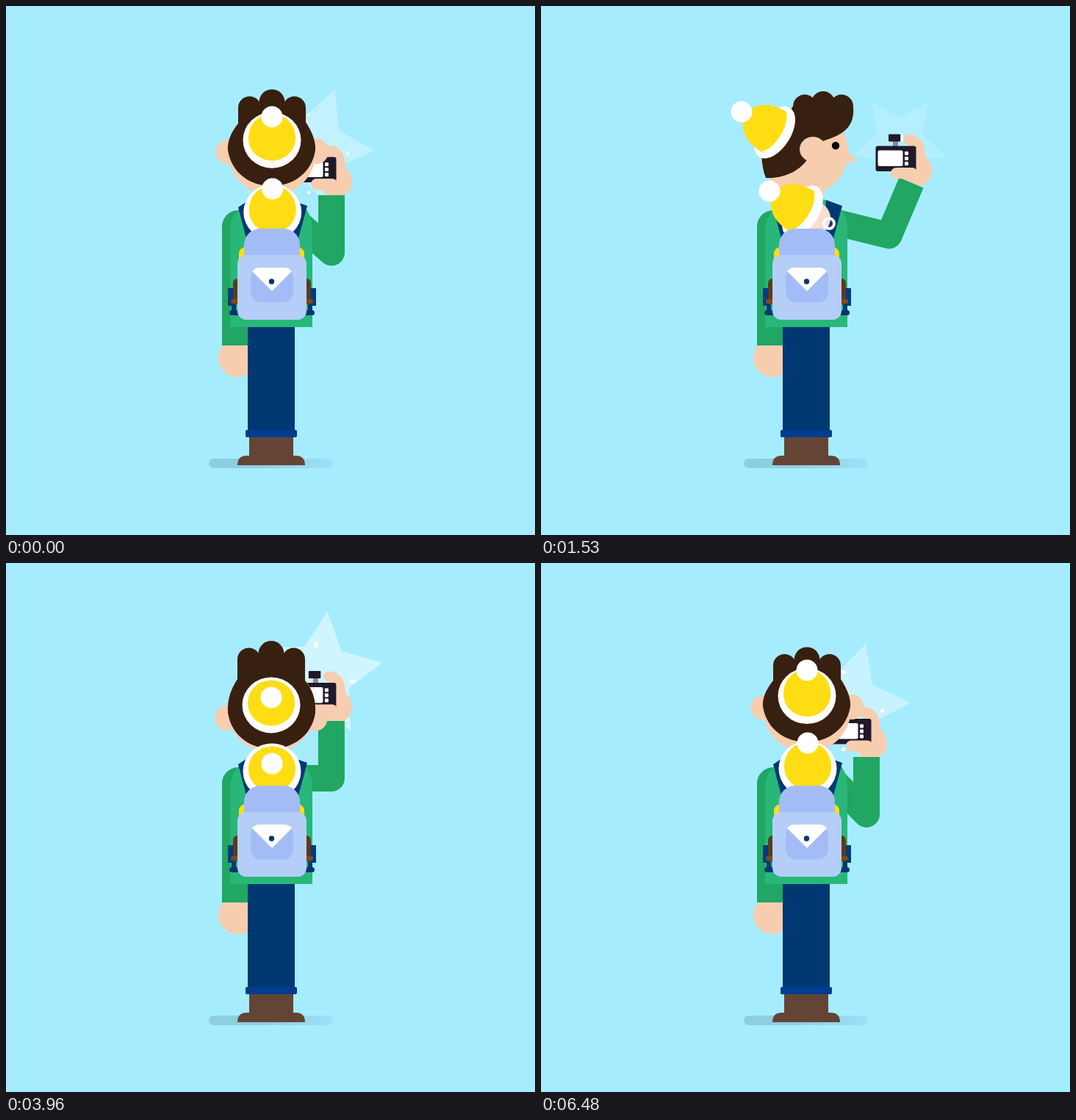
Write an HTML page with a canvas that moves like this. It is 720x720 px and loops after 6.51 s.

```html
<!DOCTYPE html>
<html lang="en">
<head>
<meta charset="utf-8">
<title>Traveller with a camera</title>
<style>
html, body { margin: 0; width: 100%; height: 100%; overflow: hidden; background: #a6ecff; }
canvas { display: block; width: 720px; height: 720px; }
</style>
</head>
<body>
<canvas id="stage" width="720" height="720"></canvas>
<script>
const c = document.getElementById('stage').getContext('2d');
const LOOP = 6510, HALF = LOOP / 2, STEP = 30, TAU = Math.PI * 2;
const SKY = '#a6ecff', SKIN = '#f7cdaf', HAIR = '#372010', NAVY = '#003872', YELLOW = '#ffdd15',
  SLEEVE = '#21a663', JACKET = '#28b779', LILAC = '#a4bcf6', INK = '#20192a', WHITE = '#fff';

// ---- motion ----
const lerp = (a, b, k) => a + (b - a) * k;
function ramp(t, from, to) {
  const u = Math.min(1, Math.max(0, (t - from) / (to - from)));
  return u * u * (3 - 2 * u);
}

// Each half: look up, turn aside, raise the camera, turn back. Right first, then left.
function stateAt(t) {
  const beat = t + 34, p = beat % HALF;
  const out = ramp(p, 734, 1034), back = ramp(p, 2184, 2639);
  return {
    side: Math.floor(beat / HALF) % 2 ? -1 : 1,
    turn: out - back,
    lift: ramp(p, 0, 150) - out + ramp(p, 1384, 1884) - back
  };
}

// start time and centre of each flash
const flashes = [
  [380, 424, 152], [1008, 488, 184], [1890, 488, 135], [2800, 417, 192],
  [3630, 427, 152], [4560, 258, 193], [5290, 248, 146], [6075, 417, 192]
];
const FLASH = 600;

// ---- drawing helpers ----
function oval(x, y, rx, ry, color, angle = 0) {
  c.fillStyle = color;
  c.beginPath();
  c.ellipse(x, y, rx, ry, angle, 0, TAU);
  c.fill();
}
const disc = (x, y, r, color) => oval(x, y, r, r, color);

function box(x, y, w, h, color, r = 0) {
  c.fillStyle = color;
  c.beginPath();
  c.roundRect(x, y, w, h, r);
  c.fill();
}
function shape(d, color) {
  c.fillStyle = color;
  c.fill(new Path2D(d));
}
function line(p, width, color, cap = 'butt') {
  c.strokeStyle = color;
  c.lineWidth = width;
  c.lineCap = cap;
  c.lineJoin = 'round';
  c.beginPath();
  for (let i = 0; i < p.length; i += 2) c.lineTo(p[i], p[i + 1]);
  c.stroke();
}
function placed(x, y, draw, angle = 0) {
  c.save();
  c.translate(x, y);
  c.rotate(angle);
  draw();
  c.restore();
}

// ---- flash ----
function drawStar(u) {
  const start = (104 * u + 18 * Math.max(0, 1 - u / .7)) * TAU / 360;
  const radius = 87 * (1 - Math.abs(2 * u - 1) ** 4.6);
  c.fillStyle = WHITE;
  c.globalAlpha = .65 * (1 - u * u);
  c.beginPath();
  for (let i = 0; i < 10; i++) {
    const a = start + i * TAU / 10, r = i % 2 ? radius / 2 : radius;
    c.lineTo(r * Math.cos(a), r * Math.sin(a));
  }
  c.fill();
  c.globalAlpha = 1;
}

function drawSparks(u) {
  if (u < .25 || u > .9) return;
  const dist = 54 * (1 - (1 - u) ** 3.2), len = Math.min(10, 24 * (.9 - u));
  for (let a = 0; a < 4; a++)
    placed(-5, 9, () => oval(dist, 0, len / 2, Math.min(len, 5.5) / 2, WHITE), a * TAU / 4);
}

function drawFlashes(t) {
  for (const [start, x, y] of flashes) {
    const u = (t - start + LOOP) % LOOP / FLASH;
    if (u < 1) placed(x, y, () => { drawStar(u); drawSparks(u); });
  }
}

// ---- arm and camera ----
function drawArm({ side, turn, lift }) {
  const left = side < 0 ? turn : 0;
  const wx = 443 + (side < 0 ? -160 : 61) * turn, wy = 264 - 9 * turn - 49 * lift;
  const lean = (side < 0 ? -.66 : .4) * turn;
  const ex = wx - 78 * Math.sin(lean), ey = wy + 78 * Math.cos(lean);
  const cx = wx - 21 - 16 * left, cy = wy - 35 + 5 * Math.abs(lean);

  placed(cx, cy, () => {
    shape('M10 -27C14 -36 26 -33 33 -26C39 -20 39 -13 40 -5C43 3 49 8 49 16L10 16L20 -14C18 -19 10 -20 10 -27Z', SKIN);
    disc(27, 16, 22, SKIN);
  });
  line([395, 293, ex, ey, wx, wy], 36, SLEEVE);
  placed(cx, cy, () => {
    box(-4 + 2.5 * left, -24, 7, 8, '#8b8b93');
    box(-10 + 2.5 * left, -33, 16.5, 10, INK, 1);
    if (turn > .2) box(side < 0 ? -11 : 6.5, -33, 3.5, 10, WHITE);
    box(-27.5, -17, 55, 34.5, INK, 3);
    box(-24.5 + 8 * left, -11, 34, 21.5, WHITE, 2);
    for (let i = -1; i < 2; i++) box(12 + 8 * left, i * 7 - 2.5, 5, 5, WHITE, 1);
    line([0.5, 20, 22, 20], 15, SKIN, 'round');
  });
}

// ---- body ----
function drawBody() {
  disc(315, 479, 26, SKIN);
  const shade = c.createLinearGradient(276, 0, 445, 0);
  shade.addColorStop(0, '#8ccddf');
  shade.addColorStop(.45, '#8ecfe2');
  shade.addColorStop(1, '#9de1f9');
  box(276, 616, 169, 13, shade, 6.5);
  shape('M315 625Q315 612 328 612H331V586H391V612H394Q407 612 407 625Z', '#644535');
  box(329, 430, 64, 150, NAVY);
  box(326, 577, 70, 10, '#003d8f', 2);
  box(294, 278, 35, 184, SLEEVE, [22, 0, 0, 0]);
  shape('M305 437V310C305 288 313 279 322 274L345 260H378L400 270C412 276 417 290 417 305V437Z', JACKET);
  shape('M316 274L334 262L342 320H328Z', NAVY);
  shape('M388 264L410 272L397 320H384Z', NAVY);
}

// ---- head and baby; turn 0 shows the back, 1 the profile; up tips the back view ----
function drawHat(x, y, turn, up) {
  const dx = -45 * turn, dy = lerp(-35 + 24.5 * up, -28, turn);
  const reach = lerp(48 - 3 * up, 61, turn), depth = lerp(38, 22, turn);
  placed(x, y, () => {
    oval(0, 0, depth, 39.5, WHITE);
    oval(lerp(2, 5, turn), 0, depth - 8, 32, YELLOW);
    c.beginPath();
    c.moveTo(0, 32);
    c.bezierCurveTo(reach, 34, reach, -34, 0, -32);
    c.fill();
  }, Math.atan2(dy, dx));
  disc(x + dx, y + dy, 14.5, WHITE);
}

function drawHair(turn, up) {
  const at = (a, b) => lerp(a, b, turn);
  const tuft = i => ({
    x: at(362 + 30.5 * i, 384 + 25 * i),
    y: at(132 + 7.5 * Math.abs(i), 132 + 4.5 * Math.abs(i)) - 8.5 * up,
    r: at(17.5 - 2 * Math.abs(i), 16)
  });
  const tufts = [-1, 0, 1].map(tuft), [first, middle, last] = tufts;
  const drop = 9 * up;
  c.fillStyle = HAIR;
  c.beginPath();
  c.moveTo(at(316, 336), at(160, 146));
  c.bezierCurveTo(at(306, 306), at(172, 160), at(301, 292), at(185, 195), at(302, 306), at(195, 234) + drop);
  c.bezierCurveTo(at(312, 325), at(260, 235) + drop, at(411, 350), at(260, 228) + drop, at(421, 363), at(195, 208) + drop);
  c.bezierCurveTo(at(422, 345), at(185, 175), at(417, 430), at(172, 195), at(408, 425), at(158, 138));
  c.lineTo(last.x + last.r, last.y);
  c.lineTo(middle.x, middle.y);
  c.lineTo(first.x - first.r, first.y);
  c.fill();
  for (const { x, y, r } of tufts) disc(x, y, r, HAIR);
}

function drawHead(turn, up) {
  const at = (a, b) => lerp(a, b, turn);
  const earY = at(196 + 15 * up, 195);
  const nearEar = () => oval(at(423, 370), earY, at(16, 18), 17, SKIN);

  if (turn < .25) disc(302 + turn * 60, earY + 1, 16.5, SKIN);
  if (turn < .12) nearEar();
  if (turn > .3) oval(at(362, 420), 207.5, 7.5, 6.5, SKIN);
  disc(at(362, 358), 198, 60, SKIN);
  box(345, 245, 40, 16, SKIN);
  if (turn > .75) disc(at(441, 401), 190, 5.2, '#000');
  drawHair(turn, up);
  if (turn >= .12) nearEar();
  drawHat(at(362, 318), at(181 + 12.5 * up, 172), turn, up);
}

function drawBaby(turn, up) {
  if (turn > .2) disc(358 + 13 * turn, 289, 23, '#fbdccf');
  if (turn > .55) {
    c.strokeStyle = WHITE;
    c.lineWidth = 4;
    c.beginPath();
    c.arc(392, 296, 7, 0, TAU);
    c.stroke();
  }
  drawHat(lerp(363 - 2 * up, 356, turn), 280 + 3.5 * up, turn, up);
}

// Turns a part about a pivot while it keeps stage coordinates.
function tilted(angle, px, py, draw) {
  placed(px, py, () => placed(-px, -py, draw), angle);
}

// ---- backpack ----
function drawPack() {
  box(317, 328, 89, 30, YELLOW, 9);
  for (const side of [1, -1]) {
    c.save();
    c.translate(362, 0);
    c.scale(side, 1);
    box(-60, 384, 8, 24, '#003c80');
    box(-55, 400, 6, 18, NAVY);
    box(-58, 414, 14, 7, NAVY, 3.5);
    box(-53, 371, 14, 35, '#5b3a1c', [6, 0, 0, 0]);
    box(-56, 399, 14, 6, '#7a4a1c', 2);
    c.restore();
  }
  box(324, 303, 76, 60, LILAC, 22);
  box(315, 339, 94, 88, '#b5cef8', 12);
  box(333, 356, 58, 47.5, LILAC, 14);
  shape('M335 361Q339 356 345 356H379Q385 356 389 361L362 388Z', WHITE);
  disc(361.5, 375, 3.7, NAVY);
}

function render(t) {
  const state = stateAt(t), { side, turn, lift } = state;
  const up = lift * (1 - turn), tilt = turn * (.055 - .185 * lift);
  c.fillStyle = SKY;
  c.fillRect(0, 0, 720, 720);
  drawFlashes(t);
  drawArm(state);
  drawBody();
  c.save();
  if (side < 0 && turn > 0) {
    c.translate(723, 0);
    c.scale(-1, 1);
  }
  tilted(tilt, 362, 215, () => drawHead(turn, up));
  tilted(tilt, 365, 300, () => drawBaby(turn, up));
  c.restore();
  drawPack();
}

const begin = performance.now();
function tick() {
  const t = (performance.now() - begin) % LOOP;
  render(Math.floor(t / STEP) * STEP);
  requestAnimationFrame(tick);
}
tick();
</script>
</body>
</html>
```
